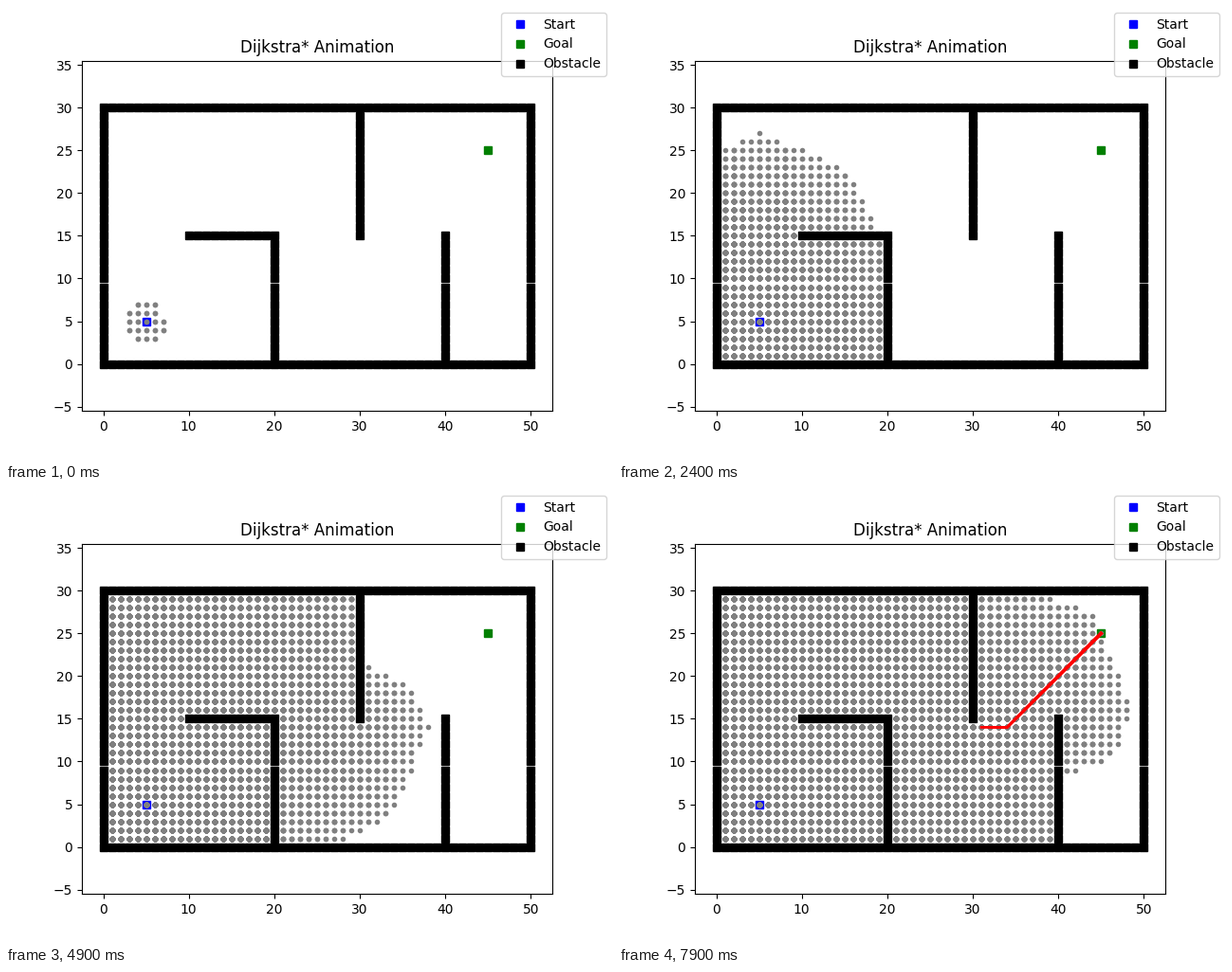
Recreate the animation shown at these times as a matplotlib script. Size 640 px wide and 480 px high, loop 8 s.

```python
import math
from itertools import product

import matplotlib.pyplot as plt
from matplotlib.animation import FuncAnimation

WIDTH, HEIGHT = 51, 31
START, GOAL = (5, 5), (45, 25)
FRAMES, INTERVAL = 80, 100
BATCH = 20  # nodes revealed per frame
MOVES = [m for m in product((-1, 0, 1), repeat=2) if m != (0, 0)]


def build_walls():
    walls = {(x, y) for x in range(WIDTH) for y in (0, HEIGHT - 1)}
    walls |= {(x, y) for x in (0, WIDTH - 1) for y in range(HEIGHT)}
    walls |= {(x, 15) for x in range(10, 21)}
    walls |= {(20, y) for y in range(15)}
    walls |= {(30, y) for y in range(15, 30)}
    walls |= {(40, y) for y in range(16)}
    return walls


def blocked(a, b, walls):
    """Diagonal steps may not cut a wall corner."""
    return b in walls or (a[0], b[1]) in walls or (b[0], a[1]) in walls


def search(walls):
    """Return the nodes in expansion order and the path from goal to start."""
    cost, parent = {START: 0}, {START: START}
    queue, visited = {(0, START)}, []
    while queue:
        entry = min(queue)
        queue.remove(entry)
        node = entry[1]
        visited.append(node)
        if node == GOAL:
            break
        for dx, dy in MOVES:
            nxt = (node[0] + dx, node[1] + dy)
            if blocked(node, nxt, walls):
                continue
            new_cost = cost[node] + math.hypot(dx, dy)
            if new_cost < cost.get(nxt, math.inf):
                cost[nxt], parent[nxt] = new_cost, node
                queue.add((new_cost, nxt))
    path = [GOAL]
    while path[-1] != START:
        path.append(parent[path[-1]])
    return visited, path


walls = build_walls()
visited, path = search(walls)

fig, ax = plt.subplots(figsize=(6.4, 4.8), dpi=100)
ax.plot(*START, "bs", label="Start")
ax.plot(*GOAL, "gs", label="Goal")
ax.plot(*zip(*sorted(walls)), "ks", label="Obstacle")
ax.set_title("Dijkstra* Animation")
ax.axis("equal")
ax.set_xlim(-2.5, 52.5)
fig.legend()

# Every frame paints over the earlier ones, so soft marker edges darken with age.
layers = []


def add_layer(frame, points, style, **kwargs):
    line, = ax.plot(*zip(*points), style, visible=False, **kwargs)
    layers.append((frame, line))


search_frames = math.ceil(len(visited) / BATCH)
add_layer(0, visited[:BATCH], ".", color="gray")
for frame in range(FRAMES):
    if frame < search_frames:
        add_layer(frame, visited[:BATCH * (frame + 1)], ".", color="gray")
    else:
        add_layer(frame, path[:frame - search_frames + 1], "r-", linewidth=2)


def update(frame):
    for first, line in layers:
        line.set_visible(first <= frame)
    return [line for _, line in layers]


anim = FuncAnimation(fig, update, frames=FRAMES, interval=INTERVAL,
                     init_func=lambda: update(0), repeat=True, blit=False)
plt.show()
```
